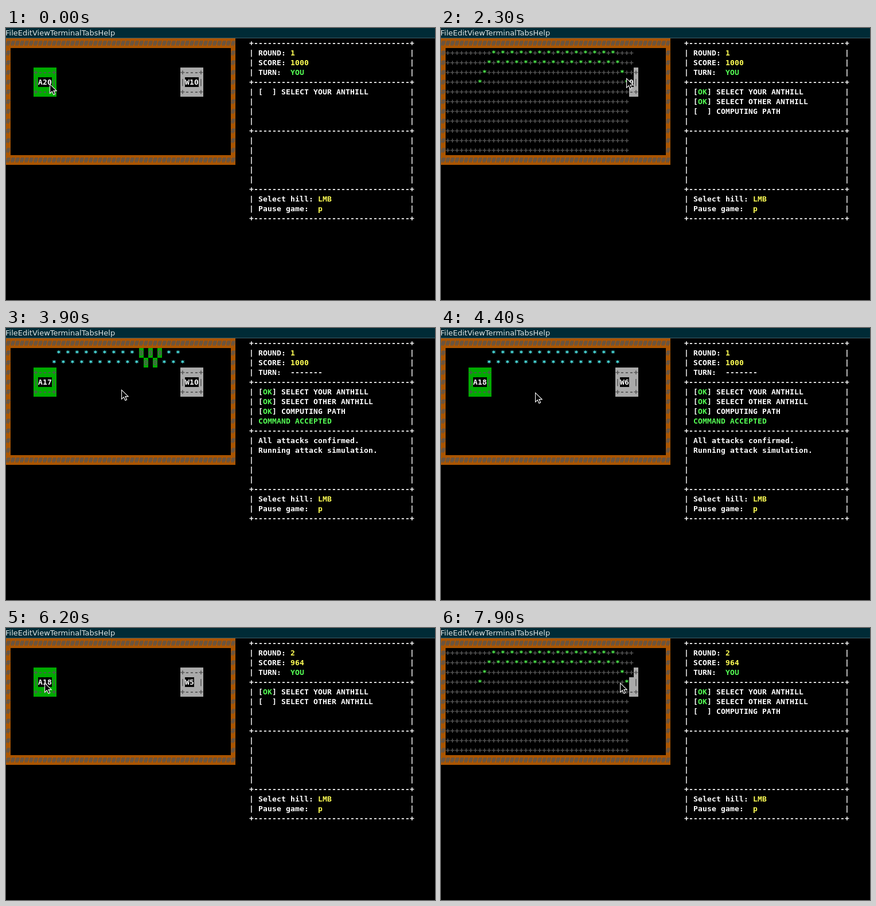
These frames come from a looping animation (748x475 px, 8000 ms). An HTML page:

```html
<!DOCTYPE html>
<html lang="en">
<head>
<meta charset="utf-8">
<title>Anthill terminal game</title>
<style>
html, body { margin: 0; width: 100%; height: 100%; overflow: hidden; background: #000; }
svg { display: block; width: 748px; height: 475px; }
text { white-space: pre; }
#screen { font: bold 13px "DejaVu Sans Mono", monospace; }
#menu { font: 13px "DejaVu Sans", sans-serif; fill: #dfe3e3; }
rect { shape-rendering: crispEdges; }
</style>
</head>
<body>
<svg viewBox="0 0 748 475">
  <rect width="748" height="475"/>
  <rect width="748" height="18" fill="#002b36"/>
  <rect y="17" width="748" height="1" fill="#3f5f68"/>
  <text id="menu" x="-1" y="13">FileEditViewTerminalTabsHelp</text>
  <g id="screen"></g>
  <path id="cursor" d="M.6 1.2V17.2L4.3 13.7L7 19.4L9.6 18.2L7 12.6H12.2Z" fill="#000" stroke="#fff" stroke-width="1.1"/>
</svg>
<script>
const LOOP = 8000, TICK = 100;
const CW = 8, CH = 17, TOP = 18;
const WHITE = '#fff', DARK = '#555', BROWN = '#a50', GREEN = '#0a0', GRAY = '#aaa',
      LIME = '#5f5', YELLOW = '#ff5', CYAN = '#5ff';
const screen = document.getElementById('screen');
const cursor = document.getElementById('cursor');

// time, x, y of the pointer tip
const pointer = [
  [900, 76, 97], [1300, 228, 81], [1700, 323, 87], [3400, 323, 87],
  [3900, 201, 107], [4300, 164, 112], [4600, 164, 112], [4900, 91, 89],
  [5000, 91, 89], [5200, 67, 95], [6400, 67, 95], [6500, 241, 95],
  [6600, 241, 95], [6800, 298, 94], [6900, 298, 94], [7100, 308, 94],
  [7200, 308, 94], [7400, 312, 95]
];

let out = '';

function put(col, row, str, fg, bg) {
  const x = col * CW, y = TOP + row * CH;
  if (bg) out += `<rect x="${x}" y="${y}" width="${str.length * CW}" height="${CH}" fill="${bg}"/>`;
  if (!str.trim()) return;
  const xs = [...str].map((_, i) => x + i * CW).join(' ');
  out += `<text x="${xs}" y="${y + 13}" fill="${fg}">${str}</text>`;
}

// Zigzag route between the hills, one cell per column
function routeRow(col) {
  if (col < 11) return 12 - col;
  if (col > 37) return col - 36;
  return col % 2 ? 1 : 2;
}

function star(col, color, bg) {
  put(col, routeRow(col), '*', color, bg);
}

function walls() {
  const line = '#'.repeat(50);
  put(0, 0, line, DARK, BROWN);
  put(0, 12, line, DARK, BROWN);
  for (let r = 1; r < 12; r++) {
    put(0, r, '#', DARK, BROWN);
    put(49, r, '#', DARK, BROWN);
  }
}

function hill(col, label, color) {
  put(col, 3, '+---+', DARK, color);
  put(col, 4, '|   |', DARK, color);
  put(col, 5, '+---+', DARK, color);
  put(col + 1, 4, label, WHITE, '#000');
}

function flood() {
  for (let r = 1; r < 12; r++) put(1, r, '+'.repeat(r < 4 ? 41 : 40), DARK, '#000');
  for (let c = 8; c <= 40; c++) star(c, LIME, '#000');
}

function headAt(t) {
  const ticks = (t - 2900) / TICK - (t >= 3400 ? 1 : 0);
  return 15 + 2 * ticks;
}

function field(t) {
  const running = t >= 2900 && t < 4500;
  const head = headAt(t);
  let mine = 20, other = 10;
  if (t >= 2900) mine = 15 + (t >= 3300) + (t >= 3800) + (t >= 4300);
  if (t >= 4500) other = 5;
  else if (running) other -= Math.max(0, Math.min(5, head - 39));

  walls();
  if (t >= 2400 && t < 4500) for (let c = 10; c <= 38; c++) star(c, CYAN);
  if (running) {
    for (let c = head - 4; c <= Math.min(head, 38); c++) put(c, routeRow(c), '0', DARK, GREEN);
  }
  hill(6, 'A' + mine, GREEN);
  hill(38, 'W' + other, GRAY);
  if ((t >= 2300 && t < 2400) || t >= 7900) flood();
}

function step(row, done, label) {
  put(55, row, '[  ] ' + label, WHITE);
  if (done) put(56, row, 'OK', LIME);
}

function panel(t) {
  for (let r = 0; r < 19; r++) {
    if ([0, 4, 9, 15, 18].includes(r)) put(53, r, '+' + '-'.repeat(34) + '+', WHITE);
    else {
      put(53, r, '|', WHITE);
      put(88, r, '|', WHITE);
    }
  }
  const second = t >= 5400, sim = t >= 2900 && !second;
  put(55, 1, 'ROUND:', WHITE);
  put(62, 1, second ? '2' : '1', YELLOW);
  put(55, 2, 'SCORE:', WHITE);
  put(62, 2, second ? '964' : '1000', YELLOW);
  put(55, 3, 'TURN:', WHITE);
  if (sim) put(62, 3, '-------', WHITE);
  else put(62, 3, 'YOU', LIME);

  const [own, target, path] = second ? [6200, 7900, LOOP] : [800, 2300, 2400];
  step(5, t >= own, 'SELECT YOUR ANTHILL');
  if (t >= own) step(6, t >= target, 'SELECT OTHER ANTHILL');
  if (t >= target) step(7, t >= path, 'COMPUTING PATH');
  if (t >= path) put(55, 8, 'COMMAND ACCEPTED', LIME);

  if (sim) {
    put(55, 10, 'All attacks confirmed.', WHITE);
    put(55, 11, 'Running attack simulation.', WHITE);
    if (t >= 4500) {
      put(55, 12, 'Simulation finished.', WHITE);
      put(55, 13, 'End of 1. round.', WHITE);
    }
  }
  put(55, 16, 'Select hill:', WHITE);
  put(68, 16, 'LMB', YELLOW);
  put(55, 17, 'Pause game:', WHITE);
  put(68, 17, 'p', YELLOW);
}

function movePointer(t) {
  let i = pointer.findIndex(k => k[0] > t);
  if (i < 0) i = pointer.length;
  const a = pointer[Math.max(0, i - 1)], b = pointer[Math.min(i, pointer.length - 1)];
  const f = b[0] > a[0] ? (t - a[0]) / (b[0] - a[0]) : 0;
  const x = Math.round(a[1] + (b[1] - a[1]) * f), y = Math.round(a[2] + (b[2] - a[2]) * f);
  cursor.setAttribute('transform', `translate(${x} ${y})`);
}

let last = -1;
function draw(now) {
  const t = Math.floor((now % LOOP) / TICK) * TICK;
  if (t !== last) {
    last = t;
    out = '';
    field(t);
    panel(t);
    screen.innerHTML = out;
    movePointer(t);
  }
}

const start = performance.now();
function loop() {
  draw(performance.now() - start);
  requestAnimationFrame(loop);
}
loop();
</script>
</body>
</html>
```
